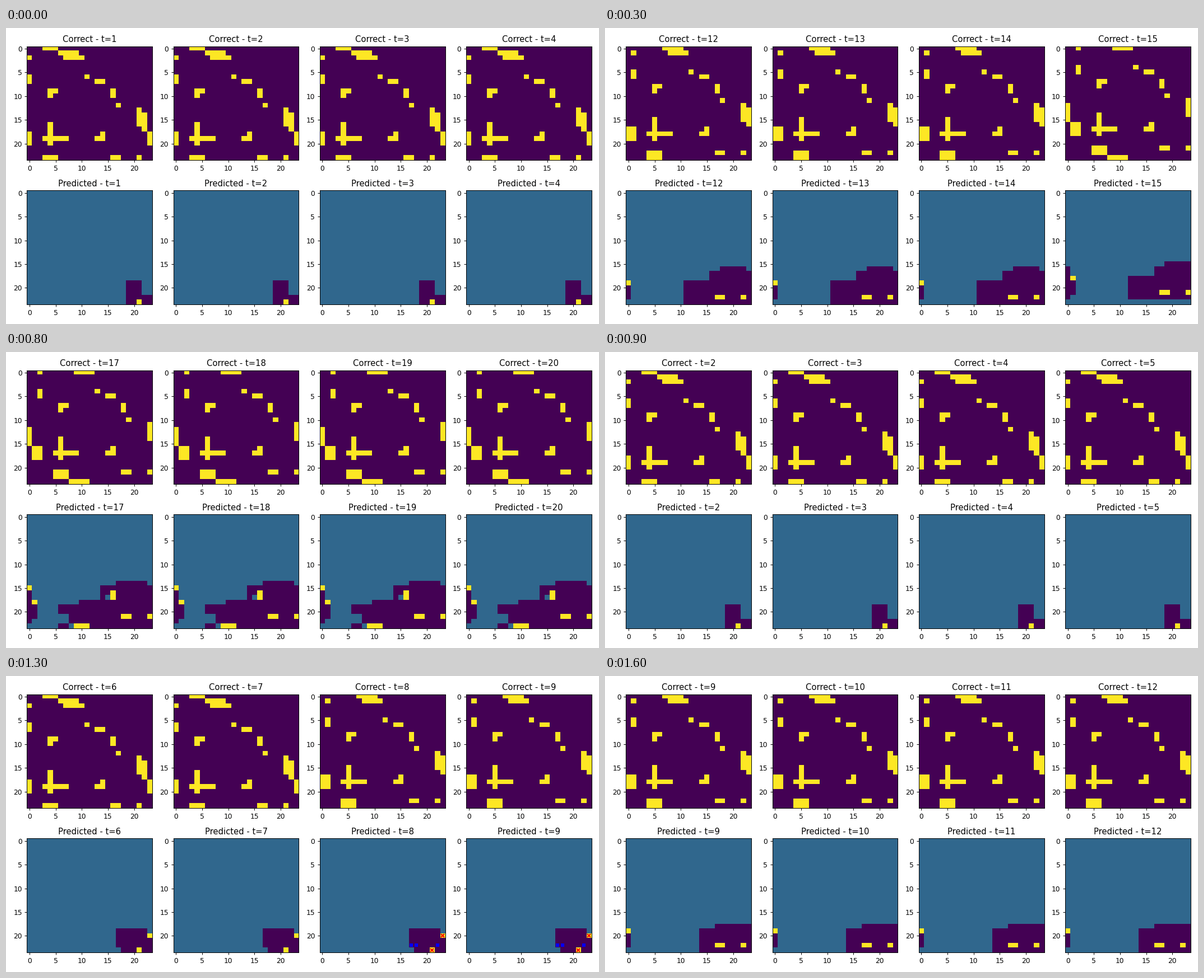
Animation, 1058 px wide and 529 px high, one loop 1.7 s. Source, as a matplotlib script:

```python
import matplotlib.pyplot as plt
import numpy as np
from matplotlib.animation import FuncAnimation

N = 24
UNKNOWN = 1 / 3
SHIFTS = (8, 15)          # times at which the world drifts up and right
LAST = 17
STEP = {"U": (0, -1), "D": (0, 1), "L": (-1, 0), "R": (1, 0)}

# Bars of wall (x, y, width, height); the rest is their mirror image
BARS = [(3, 0, 3, 1), (6, 1, 4, 1), (7, 2, 4, 1), (0, 2, 1, 1), (0, 6, 1, 2),
        (11, 6, 1, 1), (13, 7, 2, 1), (4, 9, 2, 1), (4, 10, 1, 1),
        (4, 16, 1, 5), (0, 18, 1, 3)]

BUMPS = {1: (21, 23), 4: (23, 20), 14: (23, 16)}   # walls found by touch
CLIMB_START, CLIMB = 10, "UULULULL"                # headings of the climber


def build_world():
    half = np.zeros((N, N), bool)
    for x, y, w, h in BARS:
        half[y:y + h, x:x + w] = True
    return half | half[::-1, ::-1].T


def drift(grid, steps=1):
    return np.roll(grid, (-steps, steps), axis=(0, 1))


def shifts_until(t):
    return sum(t >= s for s in SHIFTS)


def truth(t):
    return drift(world, shifts_until(t))


def view(x, y, heading):
    """Cells up to three ahead of a scout and two to either side."""
    dx, dy = STEP[heading]
    cols, rows = np.meshgrid(np.arange(N) - x, np.arange(N) - y)
    ahead = cols * dx + rows * dy
    aside = abs(cols * dy) + abs(rows * dx)
    return (ahead >= 1) & (ahead <= 3) & (aside <= 2)


def climber_path():
    x, y, path = 20, 21, {}
    for t, heading in enumerate(CLIMB, CLIMB_START):
        dx, dy = (1, -1) if t in SHIFTS else STEP[heading]
        x, y = x + dx, y + dy
        path[t] = (x, y, heading)
    return path


def explore():
    """What the scouts know at each time: open cells in view, touched walls."""
    known, masks, climber = np.zeros((N, N), bool), {}, climber_path()
    for t in range(1, LAST + 1):
        if t in SHIFTS:
            known = known | drift(known)
        scouts = [(min(22, 26 - t), 21, "L")]
        scouts.append((21, 21 - max(0, t // 2 - 4), "R") if t > 3 else (21, 21, "D"))
        if t in climber:
            scouts.append(climber[t])
        for scout in scouts:
            known |= view(*scout) & ~truth(t)
        if t in BUMPS:
            x, y = BUMPS[t]
            known[y, x] = True
        masks[t] = known.copy()
    return masks


world = build_world()
masks = explore()
starts = sorted(range(1, LAST + 1), key=str)


def predict(start, t):
    """Expected grid for time t; the drift is only learned after the first one."""
    seen = np.where(masks[start], truth(start), UNKNOWN)
    if start < SHIFTS[0]:
        return seen
    return drift(seen, shifts_until(t) - shifts_until(start))


def points(mask):
    rows, cols = np.nonzero(mask)
    return cols, rows


plt.rcParams["font.family"] = "DejaVu Sans"
fig, axes = plt.subplots(2, 4, figsize=(12, 6), dpi=1058 / 12, facecolor="white")


def add_panel(ax):
    image = ax.imshow(world, cmap="viridis", vmin=0, vmax=1, aspect="auto",
                      interpolation="nearest")
    ax.set_xticks(range(0, N, 5))
    ax.set_yticks(range(0, N, 5))
    title = ax.set_title("Predicted - t=1")
    false_wall, = ax.plot([], [], "x", color="red", ms=5, mew=1.7)
    missed_wall, = ax.plot([], [], "s", color="blue", ms=4.4, mew=0)
    ax.set_xlim(-0.5, N - 0.5)
    ax.set_ylim(N - 0.5, -0.5)
    return image, title, false_wall, missed_wall


correct, predicted = [[add_panel(ax) for ax in row] for row in axes]
fig.tight_layout()


def update(i):
    start = starts[i]
    for k in range(4):
        t = start + k
        real, guess = truth(t), predict(start, t)
        image, title, *_ = correct[k]
        image.set_data(real.astype(float))
        title.set_text(f"Correct - t={t}")
        image, title, false_wall, missed_wall = predicted[k]
        image.set_data(guess)
        title.set_text(f"Predicted - t={t}")
        false_wall.set_data(*points((guess == 1) & ~real))
        missed_wall.set_data(*points((guess == 0) & real))
    return []


anim = FuncAnimation(fig, update, frames=len(starts), init_func=lambda: update(0),
                     interval=100, repeat=True, repeat_delay=0)
plt.show()
```
